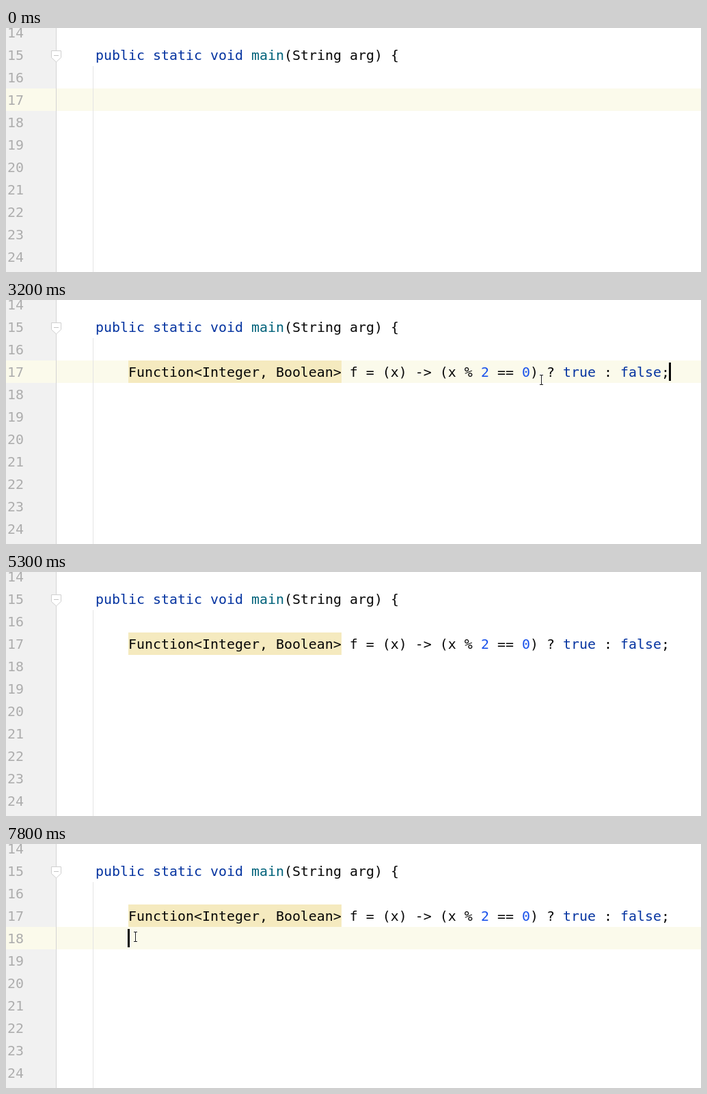
An HTML page with a canvas for the animation above (8000 ms loop, 1017x359 px).

```html
<!DOCTYPE html>
<html lang="en">
<head>
<meta charset="utf-8">
<title>Code editor</title>
<style>
  html, body { margin: 0; width: 100%; height: 100%; overflow: hidden; background: #fff; }
  canvas { display: block; }
</style>
</head>
<body>
<canvas id="stage" width="1017" height="359"></canvas>
<script>
const ctx = document.getElementById('stage').getContext('2d');
const W = 1017, H = 359, LOOP = 8000, TICK = 100;
const ROW = 33, CHAR = 12, INDENT = 4, GUTTER = 73;
const INK = '#080808', KEY = '#0433a0', NAME = '#00627a', NUM = '#1750eb';

// Moments of the story, in ms
const CLICK = 1300, PASTE = 2200, MARK = 3000, BLUR = 5300, NEXT_ROW = 6900, TAB = 7300, TAB_2 = 7500;

const rowTop = n => 89 + (n - 17) * ROW;
const colX = c => 83 + c * CHAR;
const within = (t, from, to) => t >= from && t < to;
const mix = (a, b, p) => a + (b - a) * p;
const linear = p => p;
const inOut = p => p < 0.5 ? 4 * p ** 3 : 1 - 4 * (1 - p) ** 3;

const signature = [
  ['public static void ', KEY], ['main', NAME], ['(String arg) {', INK]
];
const lambda = [
  ['Function<Integer, Boolean> f = (x) -> (x % ', INK], ['2', NUM], [' == ', INK],
  ['0', NUM], [') ? ', INK], ['true', KEY], [' : ', INK], ['false', KEY], [';', INK]
];
const lambdaLength = lambda.reduce((sum, [text]) => sum + text.length, 0);
const typeLength = 'Function<Integer, Boolean>'.length;

// Pointer strokes: shown from..to, gliding from a to b during `ms` after `go`
const REST = [189, 136];
const strokes = [
  { from: 900, to: PASTE, go: 1000, ms: 300, a: [225, 48], b: [217, 109], ease: linear, dip: 0 },
  { from: 2600, to: 3900, go: 2600, ms: 1000, a: [218, 106], b: [978, 111], ease: inOut, dip: 20 },
  { from: 6300, to: 6700, go: 6300, ms: 200, a: [356, 268], b: [263, 153], ease: linear, dip: 0 },
  { from: 6700, to: TAB, go: 6700, ms: 200, a: [201, 138], b: REST, ease: linear, dip: 0 },
  { from: 7800, to: LOOP, go: 7800, ms: 1, a: REST, b: REST, ease: linear, dip: 0 }
];

function rect(x, y, w, h, color) {
  ctx.fillStyle = color;
  ctx.fillRect(x, y, w, h);
}

function write(parts, x, row) {
  for (const [text, color] of parts) {
    ctx.fillStyle = color;
    ctx.fillText(text, x, rowTop(row) + 24);
    x += text.length * CHAR;
  }
}

function drawFold() {
  ctx.beginPath();
  ctx.moveTo(66.5, 33.5);
  ctx.lineTo(80.5, 33.5);
  ctx.lineTo(80.5, 43.5);
  ctx.lineTo(73.5, 50);
  ctx.lineTo(66.5, 43.5);
  ctx.closePath();
  ctx.fillStyle = '#fff';
  ctx.fill();
  ctx.strokeStyle = '#cfcfcf';
  ctx.lineWidth = 1;
  ctx.stroke();
  rect(70, 40, 7, 1, '#c4c4c4');
}

function drawBeam(x, y) {
  ctx.beginPath();
  for (const end of [y - 6.5, y + 7.5]) {
    ctx.moveTo(x - 2, end);
    ctx.lineTo(x + 3, end);
  }
  ctx.moveTo(x + 0.5, y - 6.5);
  ctx.lineTo(x + 0.5, y + 7.5);
  ctx.strokeStyle = 'rgba(255,255,255,0.7)';
  ctx.lineWidth = 3;
  ctx.stroke();
  ctx.strokeStyle = '#1c1c1c';
  ctx.lineWidth = 1;
  ctx.stroke();
}

function drawArrow(x, y) {
  const shape = [[0, 0], [0, 15], [3.4, 12], [6, 18.5], [8.6, 17.4], [6, 11.2], [10.4, 11.2]];
  ctx.beginPath();
  for (const [dx, dy] of shape) ctx.lineTo(x + dx, y + dy);
  ctx.closePath();
  ctx.strokeStyle = 'rgba(255,255,255,0.8)';
  ctx.lineWidth = 2;
  ctx.stroke();
  ctx.fillStyle = '#222';
  ctx.fill();
}

function drawPointer(t) {
  const s = strokes.find(({ from, to }) => within(t, from, to));
  if (s) {
    const tick = Math.floor(t / TICK) * TICK;
    const p = s.ease(Math.min(1, Math.max(0, (tick - s.go) / s.ms)));
    const x = mix(s.a[0], s.b[0], p);
    const y = mix(s.a[1], s.b[1], p) + s.dip * Math.sin(Math.PI * p) ** 3;
    drawBeam(Math.round(x), Math.round(y));
  }
  if (within(t, 3900, 4000)) drawArrow(984, 110);
}

function caretColumn(t) {
  if (t < PASTE) return 2 * INDENT;
  if (t < BLUR) return 2 * INDENT + lambdaLength;
  return INDENT * ((t >= TAB) + (t >= TAB_2));
}

function drawCaret(t, row) {
  const blinkedOff = within(t, 2000, PASTE) || within(t, 4300, 4800);
  if (!row || t < CLICK || blinkedOff) return;
  rect(colX(caretColumn(t)) - 1, rowTop(row) + 3, 3, 27, '#000');
}

function draw(t) {
  const row = t < BLUR ? 17 : t >= NEXT_ROW ? 18 : 0;

  rect(0, 0, W, H, '#fff');
  rect(0, 0, GUTTER, H, '#f1f1f1');
  if (row) rect(0, rowTop(row), W, ROW, '#fbfaeb');
  rect(GUTTER, 0, 1, H, '#d4d4d4');
  rect(127, 56, 1, H - 56, '#e4e4e4');
  if (within(t, TAB, TAB_2)) rect(127, 89, 1, H - 89, '#b9b9b9');
  drawFold();

  ctx.font = '19.93px "DejaVu Sans Mono", "Noto Sans Mono", monospace';
  for (let n = 14; n <= 24; n++) write([[String(n), '#adadad']], 2, n);
  write(signature, colX(INDENT), 15);

  const codeX = colX(2 * INDENT);
  if (t >= MARK) rect(codeX, rowTop(17), typeLength * CHAR, ROW, '#f5eabf');
  if (t >= PASTE) write(lambda, codeX, 17);

  drawCaret(t, row);
  drawPointer(t);
}

const start = performance.now();
function frame() {
  draw((performance.now() - start) % LOOP);
  requestAnimationFrame(frame);
}
frame();
</script>
</body>
</html>
```
